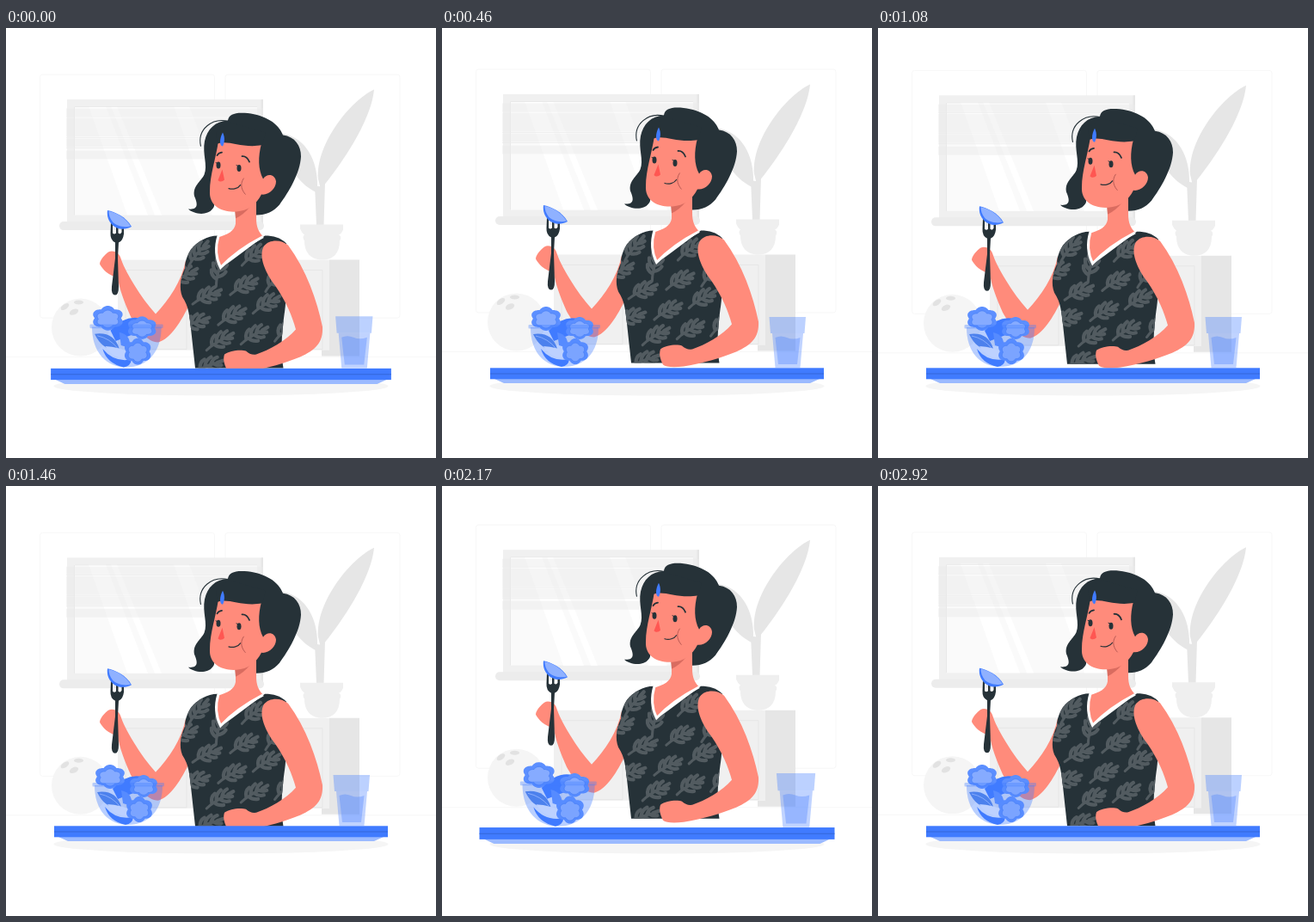
An HTML page for the animation above (2.96 s loop, 500 by 500 pixels).

```html
<!DOCTYPE html>
<html lang="en">
<head>
<meta charset="utf-8">
<title>Lunch</title>
<style>
html, body { margin: 0; width: 100%; height: 100%; overflow: hidden; background: #fff; }
svg { display: block; width: 100vw; height: 100vh; }
</style>
</head>
<body>
<svg viewBox="0 0 500 500">
  <defs>
    <clipPath id="dressClip"><use href="#dress"/></clipPath>
    <path id="dress" d="M246 242C234 242 222 249 215 258C210 266 208 273 208 280C203 290 201 303 205 313C213 325 213 335 215 350L220 396H322.500C320 380 320 365 322 348C323 334 326 323 325 312C318 275 328 262 326 251C319 244 311 242 301 242L250 280Z"/>
    <g id="leaf" fill="none" stroke="#525b60" stroke-linecap="round">
      <path d="M-19 6Q-9 1 15 -1" stroke-width="3"/>
      <path d="M-11 2Q-10 -5 -4 -7M-5 1Q-3 -6 4 -8.500M2 0Q5 -6 11 -7M-8 3Q-5 8 1 9M-1 1Q3 7 9 7M6 0Q9 3 14 3M10 -1L17 -2" stroke-width="4.200"/>
    </g>
  </defs>

  <ellipse cx="250" cy="416.500" rx="194.500" ry="11" fill="#f5f5f5"/>

  <g id="floating">
    <g id="room">
      <g fill="none" stroke="#f5f5f5" stroke-width=".8">
        <path d="M0 383H500"/>
        <rect x="39.500" y="54.500" width="203" height="283" rx="3"/>
        <rect x="255" y="54.500" width="203" height="283" rx="3"/>
      </g>

      <rect x="71" y="83.500" width="228" height="145" fill="#f0f0f0"/>
      <path d="M296.500 83.500H299V228H296.500Z" fill="#e6e6e6"/>
      <rect x="79" y="91.500" width="213" height="126.500" fill="#fafafa"/>
      <path d="M96 91.500H116L165 218H141ZM122 91.500H129L181 218H173ZM195 91.500H213L262 218H240Z" fill="#fff"/>
      <path d="M79.500 218V92H292" fill="none" stroke="#e8e8e8"/>
      <path d="M70 94H299V103H70ZM70 105H299V127H70ZM70 129H299V139H70ZM70 143H299V153H70Z" fill="#ebebeb" opacity=".5"/>
      <path d="M70 103.500H299M70 128H299M70 140H299" stroke="#ebebeb" stroke-width=".8"/>
      <rect x="62" y="225.500" width="238" height="10" rx="5" fill="#ececec"/>

      <rect x="130" y="270" width="246" height="105" fill="#f0f0f0"/>
      <path d="M376 270H411V382H367V375H376Z" fill="#e6e6e6"/>
      <path d="M139 282H210V374H139ZM218 282H368V374H218Z" fill="none" stroke="#e6e6e6"/>

      <circle cx="86.500" cy="348.500" r="33.500" fill="#f5f5f5"/>
      <g fill="#e2e2e2">
        <ellipse cx="68.500" cy="324.500" rx="5.500" ry="3" transform="rotate(-35 68.500 324.500)"/>
        <ellipse cx="84.500" cy="319.500" rx="5.500" ry="2.500"/>
        <ellipse cx="79" cy="330.500" rx="5.500" ry="3.200" transform="rotate(-25 79 330.500)"/>
      </g>

      <path d="M428 72C402 84 360 134 363 176L366 188C380 172 424 114 428 72ZM320 123C344 126 361 148 362 180V192C344 184 326 166 320 123Z" fill="#e6e6e6"/>
      <path d="M359 182Q365 188 371 180L369.500 230H361Z" fill="#e6e6e6"/>
      <path d="M342 229H392V235Q390 240 387 241Q391 243 388 248C388 263 380 270 368 270C356 270 347 263 347 248Q344 243 347 241Q344 239 342 234Z" fill="#efefef"/>
    </g>

    <g id="woman">
      <path d="M258 108C259 100 268 98 281 99.500C301 102 317 111 322 125C336 127 343 137 343 150C342 169 329 191 318 206C311 214 303 218 291 218V180L246 170L238 194C240 200 245 207 240 211C234 219 218 217 212 211C224 212 223 205 219 196C217 184 226 180 230.500 171C235 160 228 147 231 132C234 118 243 109 258 108Z" fill="#263238"/>
      <path d="M259 109C240 104 222 118 226.500 138" fill="none" stroke="#263238" stroke-width="1.100"/>

      <path id="backArm" d="M133 267C136 276 140 284 149 299C157 312 165 323 174 333C190 316 204 295 209 271L228 290L214 320C204 342 191 362 177 366C164 366 153 350 145 336C138 320 132 305 130 291C119 288 112 281 109 275C109 270 115 264 119 261C124 258 131 261 133 267Z" fill="#ff8b7b"/>

      <use href="#dress" fill="#263238"/>
      <g id="leaves" clip-path="url(#dressClip)"></g>

      <path d="M267 205V228C266 236 258 241 246 244L244 256Q245 272 250 279Q268 260 299 243C294 238 291 232 291 222V195Z" fill="#ff8b7b"/>
      <path d="M266 212L284 208Q277 217 267 222Z" fill="#d96c60"/>
      <path d="M247 242Q241 262 249.500 279Q268 259 299 243" fill="none" stroke="#fff" stroke-width="3"/>

      <path d="M247 132C244 152 237 172 237 190C236 207 250 215 268 214C281 213 291 206 297 194C306 195 314 187 314 179C313 170 303 169 299 176C293 165 293 150 297 135Q270 120 247 132Z" fill="#ff8b7b"/>
      <path d="M246 135C258 130 275 141 298 136.500L302 122L260 110L244 122Z" fill="#263238"/>
      <path d="M252 122C255 128 254 134 252 138C248 138 248 129 252 122Z" fill="#407bff"/>
      <path d="M251.500 165L246.500 177.500C249 180 252 179 254 177Z" fill="#ff5652"/>
      <path d="M276.500 175C271 183 275 190 278.500 194" fill="none" stroke="#a84f4c" stroke-width=".8"/>
      <g fill="none" stroke="#263238" stroke-linecap="round">
        <path d="M245.500 148.500Q247 145.500 251 145M274.500 149.500Q280 149 283 156" stroke-width="1.800"/>
        <path d="M259 187C264 188.500 270 187 272.500 183" stroke-width="1.200"/>
        <path d="M244 157L246 158M268 160L270 161" stroke-width="1"/>
      </g>
      <g fill="#263238">
        <ellipse cx="247" cy="160" rx="2.500" ry="4"/>
        <ellipse cx="271" cy="163.500" rx="2.500" ry="4"/>
      </g>

      <path id="frontArm" d="M300 254C306 246 320 246 328 253C349 281 362 318 368 348C369 366 360 375 342 383C325 390 304 396 281 400Q262 402 257 398C254 392 252 386 254 380C260 375 274 374 279 376Q284 381 291 380C306 375 326 364 337 351C333 336 326 319 313 300C302 286 293 266 300 254Z" fill="#ff8b7b"/>

      <g id="fork">
        <path d="M122 227H124V239Q126 241 128 239V228H130.500V239Q133 241 134.500 238V228H137V240Q136 248 131 250L130 268L131 301Q131 311 127 311Q122 311 123 301L127 268V250Q121 247 121.500 239Z" fill="#263238"/>
        <path d="M118 212.500C126 214 140 220 146 231.500C138 235.500 130 235 124 230C119 225 117 219 118 212.500Z" fill="#407bff"/>
        <path d="M119.500 213.500C128 215 139 221 145 231C136 233 128 230 124 226C121 222 119.500 218 119.500 213.500Z" fill="#8fb1ff"/>
      </g>
    </g>
  </g>

  <g id="table">
    <path d="M61 408H439L428 413H72Z" fill="#9bbaff"/>
    <rect x="56" y="395.300" width="388" height="13" fill="#407bff"/>
    <path d="M56 402H444" stroke="#3567d8"/>

    <g id="glass" fill="#407bff">
      <path d="M380.500 336H423L421.500 355H382Z" opacity=".35"/>
      <path d="M384 355H420L416.500 395H387.500Z" opacity=".33"/>
      <path d="M387.500 360Q394 357 401 360T416.500 360L413 391H391Z" opacity=".32"/>
    </g>

    <g id="bowl">
      <path d="M103 348C103 378 120 394 142 394C165 394 182 378 182 348Z" fill="#407bff" opacity=".25"/>
      <path d="M124 352Q140 334 158 338L151 356L130 364Z" fill="#407bff"/>
      <path d="M106 356Q128 353 134 373Q116 377 106 356Z" fill="#4f82ea"/>
      <path d="M134 354Q148 357 146 372L136 369Z" fill="#5b8eff"/>
      <path d="M115 373Q128 389 148 385Q147 393 139 394Q120 390 115 373Z" fill="#407bff"/>
      <path d="M118 370Q134 371 146 377L142 384Q127 384 118 370Z" fill="#d3e0ff"/>
      <path d="M109 358Q123 361 132 372" fill="none" stroke="#a4c0ff" stroke-width=".8"/>
      <g id="lettuce"></g>
      <path d="M103 348C103 378 120 394 142 394C165 394 182 378 182 348Z" fill="#407bff" opacity=".15"/>
      <rect x="100.500" y="345" width="83.500" height="4.500" rx="1" fill="#407bff" opacity=".35"/>
    </g>
  </g>
</svg>
<script>
const byId = id => document.getElementById(id);

// Dress print: x, y, rotation
byId('leaves').innerHTML = [
  [223, 261, -40], [234, 311, -14], [277, 299, -18], [263, 334, -18],
  [289, 263, -25], [303, 320, -20], [249, 363, -20], [289, 356, -20],
  [220, 342, -10], [236, 392, -10], [247, 281, -65], [207, 288, -20],
  [314, 291, -35], [326, 350, -30], [276, 394, -20]
].map(([x, y, turn]) =>
  `<use href="#leaf" transform="translate(${x} ${y}) rotate(${turn})"/>`).join('');

// Scalloped outline with rounded lobes
function ruffle(cx, cy, rx, ry, lobes) {
  const points = [];
  for (let i = 0; i < 120; i++) {
    const a = i / 120 * Math.PI * 2;
    const r = 0.88 + 0.2 * Math.abs(Math.sin(lobes * a / 2));
    points.push(`${(cx + rx * r * Math.cos(a)).toFixed(1)},${(cy + ry * r * Math.sin(a)).toFixed(1)}`);
  }
  return points.join(' ');
}

byId('lettuce').innerHTML = [
  [121, 338, 17, 13, 6], [160, 349, 16, 12, 6], [155, 376, 15, 14, 6]
].map(([x, y, rx, ry, lobes]) => `
  <polygon points="${ruffle(x, y, rx, ry, lobes)}" fill="#5c8fff"/>
  <polygon points="${ruffle(x, y + 1, rx * .72, ry * .72, lobes)}" fill="#86abff" stroke="#4a80f5" stroke-width=".8"/>`).join('');

const LOOP = 2960, STEPS = 71, PERIOD = 1500, LEAD = 30;
const BEAT = [[0, 1], [.1, 1.1], [.3, 1], [.4, 1], [.5, 1.1], [.6, 1], [1, 1]];

function beat(p) {
  const i = BEAT.findIndex(key => key[0] > p);
  const [p0, v0] = BEAT[i - 1], [p1, v1] = BEAT[i];
  return v0 + (v1 - v0) * (p - p0) / (p1 - p0);
}

function render(ms) {
  // Motion advances at 24 steps per second
  const step = Math.floor((ms + 5) / (LOOP / STEPS)) % STEPS;
  const p = (step * 1000 / 24 + LEAD) % PERIOD / PERIOD;
  const lift = -10 * (1 - Math.abs(2 * p - 1));
  byId('floating').setAttribute('transform', `translate(0 ${lift.toFixed(3)})`);
  byId('table').setAttribute('transform',
    `translate(250 368) scale(${beat(p).toFixed(5)}) translate(-250 -368)`);
}

const start = performance.now();
function tick() {
  render((performance.now() - start) % LOOP);
  requestAnimationFrame(tick);
}
tick();
</script>
</body>
</html>
```
